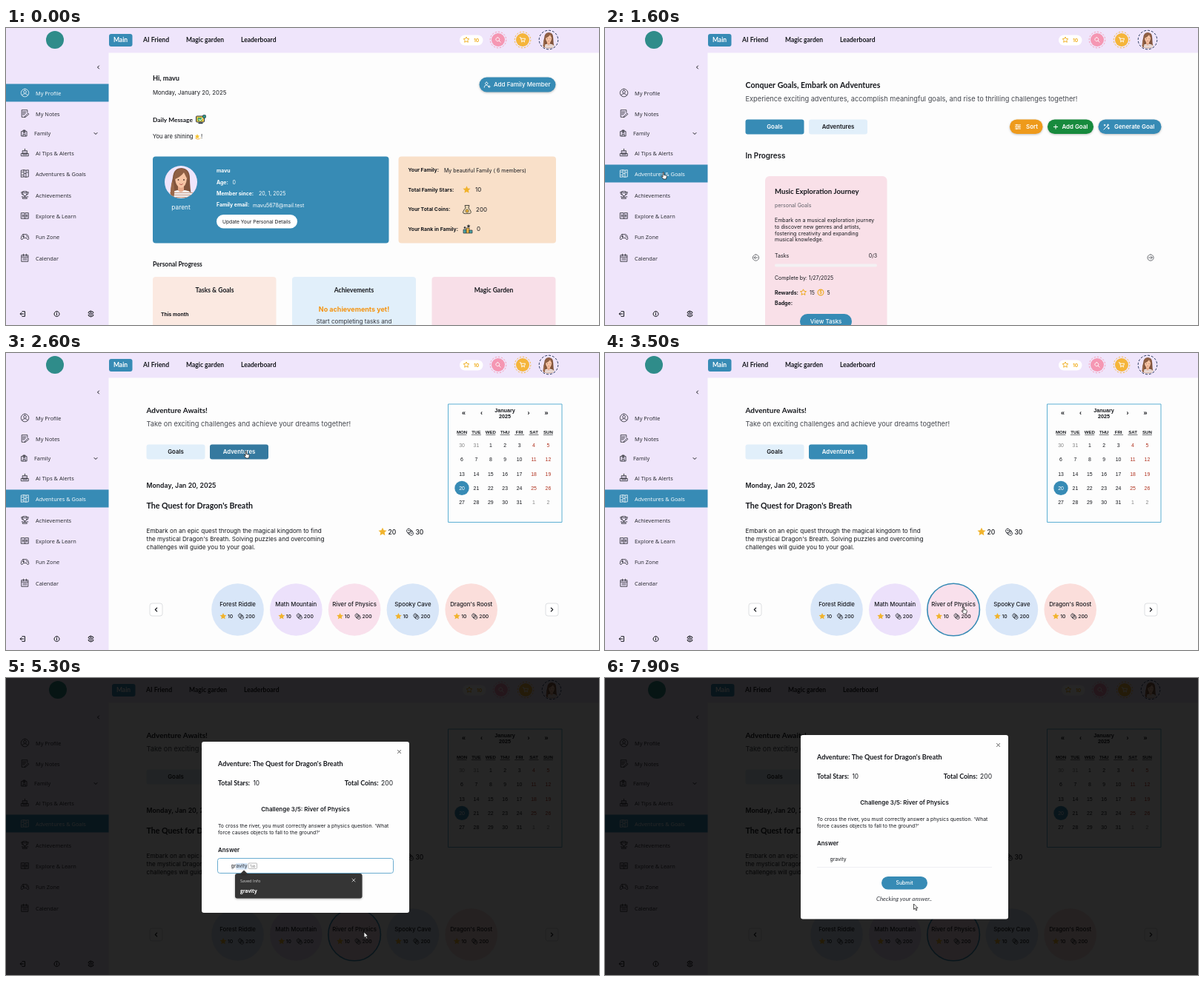
Animation, 800 px wide and 401 px high, one loop 8000 ms. Source, as an HTML page with a canvas:

```html
<!DOCTYPE html>
<html lang="en">
<head>
<meta charset="utf-8">
<title>Family adventures</title>
<style>
html, body { margin: 0; width: 100%; height: 100%; overflow: hidden; background: #fdfdfd; }
canvas { display: block; width: 800px; height: 401px; }
</style>
</head>
<body>
<canvas id="stage"></canvas>
<script>
const W = 800, H = 401, LOOP = 8000;
const cv = document.getElementById('stage');
const c = cv.getContext('2d');
const dpr = window.devicePixelRatio || 1;
cv.width = W * dpr;
cv.height = H * dpr;

const BLUE = '#378bb5', LILAC = '#efe5fb', INK = '#16181d', GOLD = '#f1b32c', SKY = '#e1effa';
const SANS = 'Inter, sans-serif', HAND = 'Lato, sans-serif';
const SIDE = '"Open Sans", sans-serif', CAL = '"Liberation Sans", Arial, sans-serif';

// y is the middle of the capitals
function text(s, x, y, size, color = INK, weight = 400, font = SANS, align = 'left') {
  c.font = `${weight} ${size}px ${font}`;
  c.textAlign = align;
  c.fillStyle = color;
  c.fillText(s, x, y + size * 0.36);
}
const hand = (s, x, y, size, align = 'left', color = INK) => text(s, x, y, size, color, 700, HAND, align);
const mid = (s, x, y, size, color, weight, font) => text(s, x, y, size, color, weight, font, 'center');

function box(x, y, w, h, r, fill, stroke, lw = 1) {
  c.beginPath();
  c.roundRect(x, y, w, h, r);
  if (fill) { c.fillStyle = fill; c.fill(); }
  if (stroke) { c.strokeStyle = stroke; c.lineWidth = lw; c.stroke(); }
}
function disc(x, y, r, fill, stroke, lw = 1, dash = []) {
  c.beginPath();
  c.arc(x, y, r, 0, 7);
  if (fill) { c.fillStyle = fill; c.fill(); }
  if (stroke) {
    c.setLineDash(dash);
    c.strokeStyle = stroke;
    c.lineWidth = lw;
    c.stroke();
    c.setLineDash([]);
  }
}
function shadowed(draw, blur = 3, alpha = 0.25) {
  c.save();
  c.shadowColor = `rgba(0,0,0,${alpha})`;
  c.shadowBlur = blur * dpr;
  c.shadowOffsetY = dpr;
  draw();
  c.restore();
}
function star(x, y, r, fill, stroke) {
  c.beginPath();
  for (let i = 0; i < 10; i++) {
    const a = i * Math.PI / 5 - Math.PI / 2, q = i % 2 ? r * 0.48 : r;
    c.lineTo(x + q * Math.cos(a), y + q * Math.sin(a));
  }
  c.closePath();
  c.lineJoin = 'round';
  if (fill) { c.fillStyle = fill; c.fill(); }
  if (stroke) { c.strokeStyle = stroke; c.lineWidth = 1; c.stroke(); }
}

// line icons on a 24 unit grid
const ICONS = {
  user: 'M12 1a11 11 0 1 0 .1 0M12 5a4 4 0 1 0 .1 0M4 19c3-6 13-6 16 0',
  note: 'M19 9V2H3v20h9M6 7h9M6 11h8M6 15h5M13 19l8-8 2 3-8 7-3 1z',
  family: 'M3 6h18v16H3zM8 6V2h8v4M8 11h2M14 11h2M8 22v-6h8v6M12 3v8',
  robot: 'M12 1v5M6 6h12v8H6zM9 10h1M14 10h1M2 14h20v7H2zM6 17h12',
  map: 'M2 3l7-1 6 1 7-1v19l-7 1-6-1-7 1zM9 2v19M15 3v19M4 8h3M17 9h3M11 12h3M4 16h3',
  trophy: 'M7 2h10v9q-5 7-10 0zM7 4H2q0 8 6 8M17 4h5q0 8-6 8M12 14v5M6 22h12l-2-4H8zM10 6h4M3 17h4M17 17h4',
  book: 'M2 4h9l1 2 1-2h9v16h-9l-1 1-1-1H2zM12 6v14M5 9h4M5 12h4M5 15h4M15 9h4M15 12h4M15 15h4',
  pad: 'M7 5h10q5 1 6 12-1 5-5 1l-2-3H8l-2 3q-4 4-5-1Q2 6 7 5zM8 8v5M5.500 10.500h5M16 9h1M18 12h1',
  cal: 'M3 4h18v18H3zM3 9h18M8 1v5M16 1v5M7 13h2M11 13h2M15 13h2M7 17h2M11 17h2M15 17h2',
  exit: 'M10 2h11v20H10M16 12H2M7 7l-5 5 5 5',
  info: 'M12 2a10 10 0 1 0 .1 0M12 11v6M12 7v1',
  gear: 'M12 8a4 4 0 1 0 .1 0M10 1h4l1 4 4-2 3 4-3 3v4l3 3-3 4-4-2-1 4h-4l-1-4-4 2-3-4 3-3v-4L2 7l3-4 4 2z',
  left: 'M16 4l-8 8 8 8', right: 'M8 4l8 8-8 8', down: 'M4 8l8 8 8-8',
  find: 'M10 3a7 7 0 1 0 .1 0M15 15l6 6',
  cart: 'M1 3h4l3 13h11l3-9H6M9 19a1 1 0 1 0 .1 0M18 19a1 1 0 1 0 .1 0',
  add: 'M10 3a4.500 4.500 0 1 0 .1 0M2 22c0-11 12-11 14-4M16 19h7M19.500 15.500v7',
  sort: 'M2 5h20M2 12h20M2 19h20M8 3v4M16 10v4M8 17v4',
  plus: 'M12 3v18M3 12h18', x: 'M4 4l16 16M20 4L4 20',
  wand: 'M2 22L16 8M13 11l3 3M18 2v6M15 5h6M5 3v5M3 5h5M20 14v6M17 17h6',
  go: 'M12 1a11 11 0 1 0 .1 0M6 12h12M13 7l5 5-5 5',
  coins: 'M8 2a6.500 6.500 0 1 0 .1 0M16 10a6.500 6.500 0 1 0 .1 0M6 8h5M14 16h5M13 5l7 5M4 14l6 7'
};
for (const k in ICONS) ICONS[k] = new Path2D(ICONS[k]);

function icon(name, x, y, size, color = INK, lw = 0.8, flip = 1) {
  const k = size / 24;
  c.save();
  c.translate(x, y);
  c.scale(k * flip, k);
  c.translate(-12, -12);
  c.lineWidth = lw / k;
  c.lineCap = c.lineJoin = 'round';
  c.strokeStyle = color;
  c.stroke(ICONS[name]);
  c.restore();
}

function blob(path, color) {
  c.fillStyle = color;
  c.fill(new Path2D(path));
}
function avatar(x, y, r) {
  c.save();
  disc(x, y, r, LILAC);
  c.clip();
  c.translate(x, y);
  c.scale(r / 22, r / 22);
  blob('M-12 24Q-15 8-11-6-10-19 1-19 12-18 12-5 12 8 15 24z', '#82553d');
  blob('M-17 24Q-16 13-5 11H6Q17 13 18 24z', '#f3f0f2');
  c.fillStyle = '#c99a83';
  for (let i = 0; i < 3; i++) c.fillRect(-15, 14 + i * 3, 31, 1);
  blob('M-4 3h8v8q-4 5-8 0z', '#e6a98a');
  blob('M-8-8Q-7-14 1-14 8-13 8-5 7 7 0 8-8 6-8-8z', '#f6c4a4');
  blob('M-10-3Q-9-18 1-18 11-17 10-2 7-6 4-13 0-7-10-3z', '#8f6045');
  blob('M-11-2Q-7 10-10 22H-14Q-15 6-11-2z', '#9a6849');
  disc(-3.5, -3, 0.9, '#4a3026');
  disc(4, -3, 0.9, '#4a3026');
  c.beginPath();
  c.arc(0.3, 1, 2.5, 0.4, 2.7);
  c.strokeStyle = '#b5564f';
  c.lineWidth = 1;
  c.stroke();
  c.restore();
}

const MENU = [
  ['user', 'My Profile', 88], ['note', 'My Notes', 116], ['family', 'Family', 142.5],
  ['robot', 'AI Tips & Alerts', 169], ['map', 'Adventures & Goals', 197], ['trophy', 'Achievements', 226],
  ['book', 'Explore & Learn', 254], ['pad', 'Fun Zone', 282.5], ['cal', 'Calendar', 311]
];

function frame(active, shift) {
  c.fillStyle = '#fdfdfd';
  c.fillRect(0, 0, W, H);
  c.fillStyle = LILAC;
  c.fillRect(0, 0, W, 33.5);
  c.fillRect(0, 0, 138.500, H);
  c.fillStyle = BLUE;
  c.fillRect(0, MENU[active][2] - 12.5, 138.500, 24);

  MENU.forEach(([name, label, y], i) => {
    const color = i === active ? '#fff' : '#22242a', fam = name === 'family';
    icon(name, fam ? 24.5 : 25.5, y - 0.5, fam ? 9.5 : 11.5, color, 0.8);
    text(label, fam ? 38 : 40, y, 7.4, color, 400, SIDE);
  });
  icon('down', 121, 142.5, 6, INK, 1);
  icon('left', 124.5, 53, 6, INK, 1);
  icon('exit', 22.5, 386, 8, INK, 1);
  icon('info', 68.5, 386, 8.5, INK, 1);
  icon('gear', 114.5, 386, 8.5, INK, 1);

  c.save();
  c.translate(shift, 0);
  disc(66, 16, 12, '#2f8c8a');
  box(139, 8, 31.500, 17, 3, BLUE);
  hand('Main', 154.5, 16, 8.5, 'center', '#fff');
  hand('AI Friend', 185, 16, 8.7);
  hand('Magic garden', 243, 16, 8.5);
  hand('Leaderboard', 317, 16, 8.5);
  box(612, 9.5, 31.500, 14, 7, '#fff');
  star(621, 16, 4, null, GOLD);
  text('10', 631, 16.500, 6.6, GOLD, 700);
  for (const [x, col, name] of [[664, '#f597b3', 'find'], [697, '#f5b53a', 'cart']]) {
    disc(x, 16, 9, col);
    disc(x, 16, 10.800, null, col, 0.9, [2.4, 1.8]);
    icon(name, x, 16, 8.5, '#fff', 0.9);
  }
  avatar(732, 16, 11.5);
  disc(732, 16, 12.800, null, '#24365c', 1, [3, 2]);
  c.restore();
}

function monitor(x, y) {
  box(x - 6, y - 4.5, 11, 8, 1, '#f5c842', '#283746', 1);
  c.fillStyle = '#49a961';
  c.fillRect(x - 4, y - 2.5, 6, 4.5);
  box(x - 3, y + 4, 6, 1.800, 0.5, '#283746');
  c.beginPath();
  c.moveTo(x - 2.500, y - 0.5);
  c.lineTo(x - 0.5, y + 1.500);
  c.lineTo(x + 3, y - 2.500);
  c.strokeStyle = '#fff';
  c.lineWidth = 1;
  c.stroke();
  box(x + 3, y - 6, 4, 4, 1, '#2f9486', '#283746', 0.7);
}
function moneyBag(x, y) {
  c.beginPath();
  c.moveTo(x - 2, y - 2);
  c.bezierCurveTo(x - 9, y + 6, x - 4, y + 6, x, y + 5.5);
  c.bezierCurveTo(x + 5, y + 6, x + 8, y + 5, x + 2, y - 2);
  c.lineTo(x + 3, y - 5.5);
  c.lineTo(x - 3, y - 5.5);
  c.closePath();
  c.fillStyle = '#e8d6b3';
  c.fill();
  c.strokeStyle = '#3d3a36';
  c.lineWidth = 0.9;
  c.stroke();
  disc(x, y + 2, 2, GOLD, '#3d3a36', 0.6);
}
function podium(x, y) {
  box(x - 6, y + 1, 4, 5, 0, '#4ba3a6', '#2f3437', 0.7);
  box(x - 2, y - 1, 4, 7, 0, '#f0b63f', '#2f3437', 0.7);
  box(x + 2, y + 2, 4, 4, 0, '#4ba3a6', '#2f3437', 0.7);
  star(x + 1, y - 3.5, 2.600, '#2f3437');
  disc(x - 4, y - 1.500, 1.300, '#2f3437');
}

function profile() {
  frame(0, 0);
  hand('Hi, mavu', 198, 67.5, 9.2);
  text('Monday, January 20, 2025', 198, 87, 7.85);
  shadowed(() => box(638.500, 66.5, 103, 20, 10, BLUE));
  icon('add', 649, 76.5, 9, '#fff', 0.9);
  text('Add Family Member', 658, 76.5, 8, '#fff', 500);
  hand('Daily Message', 198, 123.5, 8.4);
  monitor(262.5, 123.5);
  text('You are shining', 198, 146, 7.5);
  star(258, 146.500, 3.4, '#f6c32f');
  c.beginPath();
  c.arc(259, 146, 4.2, 0.6, 2.6);
  c.strokeStyle = '#f1a62c';
  c.lineWidth = 0.8;
  c.stroke();
  text('!', 263, 146, 7.5);

  box(198, 173.5, 318.500, 117, 4, BLUE);
  avatar(236, 208, 22);
  mid('parent', 236, 242, 8.3, '#fff');
  const rows = [['mavu', '', 0, 193], ['Age:', '0', 305.500, 208.5], ['Member since:', '20, 1, 2025', 341, 223.5],
    ['Family email:', 'mavu5678@mail.test', 333, 239]];
  for (const [label, value, x, y] of rows) {
    text(label, 284, y, 6.9, '#fff', 700);
    text(value, x, y, 7, '#fff');
  }
  box(284, 252, 109, 18.5, 9.2, '#fff');
  mid('Update Your Personal Details', 338, 261.5, 6.7);

  box(529.500, 173.5, 212.500, 117, 4, '#f9e0c9');
  const stats = [['Your Family:', 'My beautiful Family ( 6 members)', 591, 192, 7], ['Total Family Stars:', '10', 633, 218.5, 8],
    ['Your Total Coins:', '200', 634, 245, 8], ['Your Rank in Family:', '0', 635, 271.5, 8]];
  for (const [label, value, x, y, size] of stats) {
    text(label, 542.500, y, 6.85, INK, 700);
    text(value, x, y, size);
  }
  star(621.500, 218.5, 5.3, GOLD);
  moneyBag(622, 245);
  podium(623, 271);

  hand('Personal Progress', 198, 318.5, 8.45);
  box(198, 336, 166.500, 80, 4, '#fbe9e1');
  box(386, 336, 167, 80, 4, SKY);
  box(574.500, 336, 167, 80, 4, '#f8dfe8');
  hand('Tasks & Goals', 281.500, 353.500, 8.5, 'center');
  hand('Achievements', 469.500, 353.500, 8.5, 'center');
  hand('Magic Garden', 658, 353.500, 8.5, 'center');
  text('This month', 209, 386.500, 6.8, INK, 700);
  mid('No achievements yet!', 469.500, 380, 9, '#f5930f', 700);
  mid('Start completing tasks and', 469.500, 396, 8.1, '#33363d');
}

function tabs(second, hover) {
  box(189.500, 123.5, 79, 20, 3, second ? SKY : BLUE);
  box(275, 123.5, 79, 20, 3, second ? (hover ? '#35799f' : BLUE) : SKY);
  mid('Goals', 229, 133.5, 7.8, second ? INK : '#fff', 600);
  mid('Adventures', 314.500, 133.5, 7.8, second ? '#fff' : INK, 600);
}

function goals() {
  frame(4, 0);
  hand('Conquer Goals, Embark on Adventures', 189.500, 77, 10.6);
  text('Experience exciting adventures, accomplish meaningful goals, and rise to thrilling challenges together!',
    189.500, 95.5, 9.25, '#44474e');
  tabs(false);
  const buttons = [[546, 44.500, '#ee9a1b', 'sort', 'Sort', 568], [597, 62, '#178a3d', 'plus', 'Add Goal', 616.5],
    [665.500, 85, BLUE, 'wand', 'Generate Goal', 687]];
  for (const [x, w, col, name, label, tx] of buttons) {
    shadowed(() => box(x, 123.5, w, 19.5, 9.700, col));
    icon(name, x + 11, 133.5, name === 'plus' ? 7 : 8.5, '#fff', 1);
    text(label, tx, 133.5, 7.9, '#fff', 600);
  }
  text('In Progress', 189.500, 172.5, 9.9, INK, 600);

  box(216, 200, 164.500, 220, 6, '#f9e0e8');
  hand('Music Exploration Journey', 229, 220.5, 9.6);
  text('personal Goals', 229, 239.5, 7, '#5f6068');
  ['Embark on a musical exploration journey', 'to discover new genres and artists,',
    'fostering creativity and expanding', 'musical knowledge.'].forEach((s, i) => text(s, 229, 259.5 + i * 8.8, 7));
  text('Tasks', 229, 307, 7);
  text('0/3', 367, 307, 7, INK, 400, SANS, 'right');
  box(229, 318.5, 138, 4, 2, '#f3f1f3');
  text('Complete by: 1/27/2025', 229, 337.5, 7);
  text('Rewards:', 229, 357, 7, INK, 700);
  star(267.500, 357, 4.2, null, '#eda91d');
  text('15', 276, 357, 7);
  disc(291, 357, 3.9, null, '#eda91d', 1.1);
  mid('$', 291, 357, 5.5, '#eda91d', 700);
  text('5', 299.500, 357, 7);
  text('Badge:', 229, 371, 7, INK, 700);
  box(263, 386, 70, 20, 10, BLUE);
  mid('View Tasks', 298, 396, 7.9, '#fff', 500);
  icon('go', 203.5, 310, 9, '#4d5056', 0.8, -1);
  icon('go', 736, 310, 9, '#4d5056', 0.8);
}

function calendar() {
  box(596.5, 69, 153.500, 159.5, 0, '#fdfdfd', '#5cafd3');
  mid('January', 673, 77, 7.2, INK, 700, CAL);
  mid('2025', 673, 85.5, 7.2, INK, 700, CAL);
  [['«', 617.500], ['‹', 641.500], ['›', 705], ['»', 729]].forEach(([s, x]) => mid(s, x, 81, 9, INK, 700, CAL));
  ['MON', 'TUE', 'WED', 'THU', 'FRI', 'SAT', 'SUN'].forEach((d, i) => {
    const x = 615 + i * 19.4;
    mid(d, x, 107, 6.1, INK, 700, CAL);
    c.fillStyle = INK;
    c.fillRect(x - 6.5, 110.300, 13, 0.6);
  });
  for (let i = 0; i < 35; i++) {
    const n = i - 1, x = 615 + (i % 7) * 19.4, y = 124.5 + Math.floor(i / 7) * 19.3;
    const off = n < 1 || n > 31, day = n < 1 ? n + 31 : n > 31 ? n - 31 : n;
    if (n === 20) disc(x, y, 9.700, BLUE);
    mid(day, x, y, 6.9, n === 20 ? '#fff' : off ? '#868686' : i % 7 > 4 ? '#b0321f' : INK, 400, CAL);
  }
}

const STOPS = [['Forest Riddle', '#d8e6f8'], ['Math Mountain', '#ece1fb'], ['River of Physics', '#f9e0ec'],
  ['Spooky Cave', '#d8e6f8'], ["Dragon's Roost", '#fbdedb']];

function adventures(hover, ring, shift) {
  frame(4, shift);
  hand('Adventure Awaits!', 189.500, 77, 10);
  text('Take on exciting challenges and achieve your dreams together!', 189.500, 95.5, 9.25, '#44474e');
  tabs(true, hover);
  calendar();
  text('Monday, Jan 20, 2025', 189.500, 178.5, 8.7, INK, 600);
  hand("The Quest for Dragon's Breath", 189.500, 206, 10.6);
  ['Embark on an epic quest through the magical kingdom to find',
    "the mystical Dragon's Breath. Solving puzzles and overcoming",
    'challenges will guide you to your goal.'].forEach((s, i) => text(s, 189.500, 240.5 + i * 11, 8.15));
  star(508, 241.5, 5.800, GOLD);
  text('20', 515.5, 241.5, 8.5, INK, 500);
  icon('coins', 545, 241.5, 10.5, '#33363d', 0.9);
  text('30', 552.5, 241.5, 8.5, INK, 500);

  STOPS.forEach(([name, col], i) => {
    const x = 312.5 + i * 78.800, y = 346.5;
    disc(x, y, 35.3, col, ring && i === 2 ? BLUE : null, 1.6);
    mid(name, x, 339, 7.8, INK, 500);
    star(x - 19.500, 355.5, 4.6, GOLD);
    text('10', x - 13.5, 355.5, 6.8, INK, 500);
    icon('coins', x + 4.500, 355.5, 8.5, '#33363d', 0.8);
    text('200', x + 10.500, 355.5, 6.8, INK, 500);
  });
  for (const [x, name] of [[202.5, 'left'], [736.5, 'right']]) {
    box(x - 8.5, 338, 17, 17, 3, '#fff', '#d5d7da', 0.8);
    icon(name, x, 346.5, 7, INK, 1.2);
  }
}

function popup() {
  shadowed(() => {
    box(309, 264, 171.500, 33.5, 3, '#353535');
    blob('M316 264.500l5-5 5 5z', '#353535');
  }, 3, 0.3);
  text('Saved Info', 316, 274, 5.6, '#d0d0d0', 400, SIDE);
  text('gravity', 316, 287.5, 6.5, '#fff', 700, SIDE);
  icon('x', 469, 273, 6, '#d8d8d8', 0.8);
}

function answerField(t, y, asking) {
  if (asking) {
    c.fillStyle = '#ececf0';
    c.fillRect(286, y + 10, 236, 0.800);
  } else {
    box(285.5, y - 10.5, 237, 20, 3, '#fff', '#6aacd0');
  }
  const typed = t < 4700 ? '' : t < 5000 ? 'g' : t < 5700 ? 'gr' : 'gravity';
  const x = 303.5, size = 6.8;
  if (!typed) text('Answer', x, y, 5.7, '#7a8ba5');
  c.font = `400 ${size}px ${SANS}`;
  c.textAlign = 'left';
  const w = c.measureText(typed).width, all = c.measureText('gravity').width;
  const hint = t >= 4900 && t < 5700;
  if (hint) {
    c.fillStyle = '#d3e4f5';
    c.fillRect(x + w, y - 4, all - w, 8.5);
    text('gravity'.slice(typed.length), x + w, y, size, '#2b2e35');
    box(327, y - 4, 11.5, 7.5, 1, '#fff', '#8b8b8b', 0.6);
    mid('Tab', 332.800, y, 4.5, '#777', 400, SIDE);
  }
  text(typed, x, y, size, INK);
  if (!asking && !hint && (t - 3700) % 1000 < 500) {
    c.fillStyle = INK;
    c.fillRect(x + w, y - 4.500, 0.7, 9);
  }
  return hint;
}

function modal(t) {
  const asking = t >= 7100, d = asking ? -9 : 0;
  box(264, 86 + d, 280, asking ? 248.5 : 231, 3, '#fefefe');
  icon('x', 530.5, 99.5 + d, 6, '#444', 0.9);
  hand("Adventure: The Quest for Dragon's Breath", 286, 116 + d, 9);
  hand('Total Stars:', 286, 142 + d, 8.8);
  text('10', 333.500, 142 + d, 8.3);
  hand('Total Coins:', 502.5, 142 + d, 8.9, 'right');
  text('200', 522, 142 + d, 8.5, INK, 400, SANS, 'right');
  mid('Challenge 3/5: River of Physics', 404, 177 + d, 7.95, INK, 600);
  text("To cross the river, you must correctly answer a physics question. 'What", 286, 200 + d, 6.83);
  text("force causes objects to fall to the ground?'", 286, 209 + d, 6.83);
  text('Answer', 286, 232 + d, 7.9, INK, 600);
  const hint = answerField(t, 254 + d, asking);
  box(373, 277 + d, 62, 17.5, 8.700, t > 6800 && t < 7100 ? '#35799f' : BLUE);
  mid('Submit', 404, 286 + d, 6.9, '#fff', 500);
  if (asking) {
    const dots = '.'.repeat(1 + Math.floor((t - 7100) / 500) % 3);
    text('Checking your answer' + dots, 366, 298, 7.9, '#33363d', 'italic 400', HAND);
  }
  if (hint) popup();
}

const PATH = [[600, 352, 132], [1000, 323.5, 96], [1400, 78, 195], [1650, 78, 195], [2100, 287, 159],
  [2400, 323, 133], [2850, 323, 133], [3350, 483, 343], [6400, 483, 343], [6850, 404, 284],
  [7250, 404, 280], [7800, 416.5, 305]];

function cursorAt(t) {
  const i = PATH.findIndex(p => p[0] > t);
  if (i < 0) return PATH[PATH.length - 1].slice(1);
  const [t0, x0, y0] = PATH[i - 1], [t1, x1, y1] = PATH[i];
  const u = (t - t0) / (t1 - t0), e = u * u * (3 - 2 * u);
  return [x0 + (x1 - x0) * e, y0 + (y1 - y0) * e];
}
const ARROW = new Path2D('M0 0v7.500l1.800-1.600 1.300 3 1.300-.6-1.300-2.900h2.300z');
const POINTER = new Path2D('M0 0q1-1 1.500 0v3.500l3 .6q1 .4.8 1.600L4.500 9H.8L-1.800 5.500q0-1 1-.5L0 6z');
function cursor(t) {
  if (t < PATH[0][0]) return;
  const [x, y] = cursorAt(t);
  const over = [[1300, 1750], [2330, 2920], [3300, 3650], [6780, 7100]].some(([a, b]) => t >= a && t < b);
  const shape = over ? POINTER : ARROW;
  c.save();
  c.translate(x, y);
  c.fillStyle = '#fff';
  c.strokeStyle = '#222';
  c.lineWidth = 0.8;
  c.fill(shape);
  c.stroke(shape);
  c.restore();
}

function draw(t) {
  c.setTransform(dpr, 0, 0, dpr, 0, 0);
  if (t < 1600) profile();
  else if (t < 2450) goals();
  else {
    const open = t >= 3650;
    adventures(t < 2920, t >= 3250, open ? 4 : 0);
    if (open) {
      c.fillStyle = `rgba(0,0,0,${0.85 * Math.min(1, (t - 3650) / 100)})`;
      c.fillRect(0, 0, W, H);
      modal(t);
    }
  }
  cursor(t);
}

const start = performance.now();
function tick(now) {
  draw(Math.max(0, now - start) % LOOP);
  requestAnimationFrame(tick);
}
draw(0);
requestAnimationFrame(tick);
</script>
</body>
</html>
```
